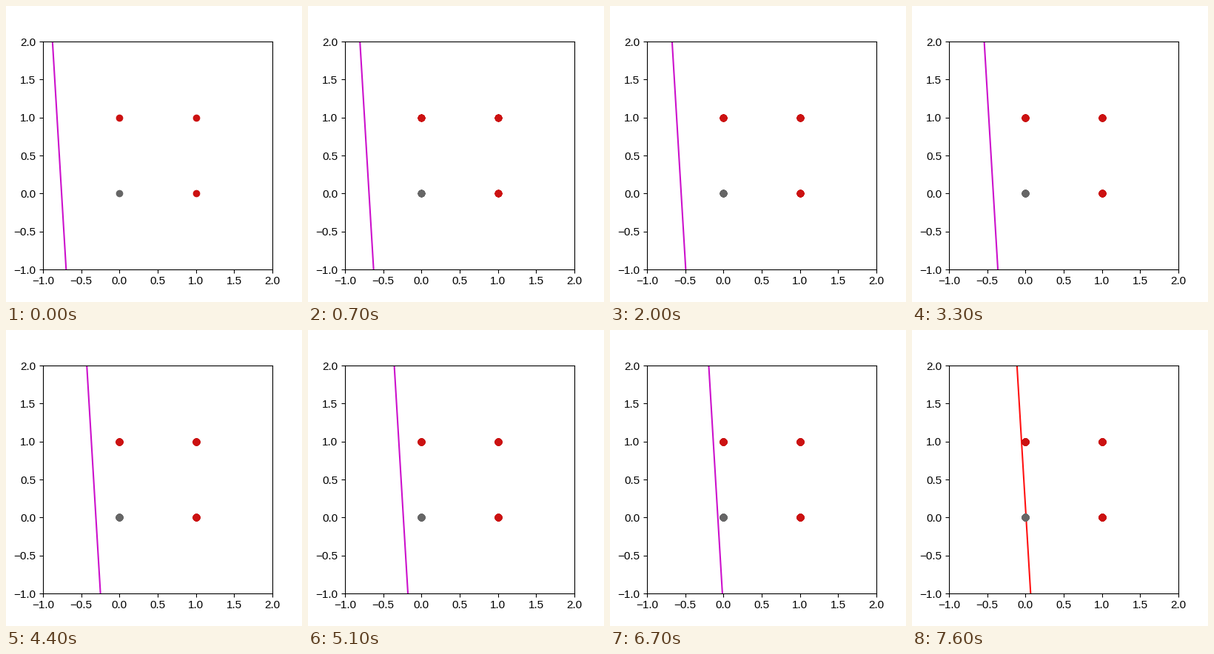
A matplotlib script for the animation above (8600 ms loop, 400 px wide and 400 px high).

```python
import matplotlib.pyplot as plt
from matplotlib.animation import FuncAnimation

plt.rcParams["font.family"] = "Liberation Sans"

TICKS, TICK_MS = 86, 100
MOVES = 75            # bias updates until the boundary stops
LAYERS = MOVES + 2    # one more overdrawn layer of dots per step
X0, STEP, TILT = -0.757, 0.0102, -0.0595
RED, GRAY = "#cc1111", "#666666"
MOVING, DONE = "#cc11cc", "#ff1111"
LOW, HIGH = -1, 2

fig, ax = plt.subplots(figsize=(4, 4), dpi=100)
ax.set(xlim=(LOW, HIGH), ylim=(LOW, HIGH))
ax.tick_params(labelsize=11)
ax.tick_params(axis="x", pad=3)

boundary, = ax.plot([], [], lw=1.5)


def dot_layer():
    ones, = ax.plot([0, 1, 1], [1, 0, 1], "o", color=RED)
    zero, = ax.plot([0], [0], "o", color=GRAY)
    return ones, zero


layers = [dot_layer() for _ in range(LAYERS)]


def update(tick):
    x = X0 + STEP * min(tick, MOVES)
    boundary.set_data([x + TILT * LOW, x + TILT * HIGH], [LOW, HIGH])
    boundary.set_color(DONE if tick > MOVES else MOVING)
    for i, layer in enumerate(layers):
        for dots in layer:
            dots.set_visible(i <= tick)
    return [boundary]


anim = FuncAnimation(fig, update, frames=TICKS, interval=TICK_MS,
                     repeat=True, repeat_delay=0, blit=False)
plt.show()
```
